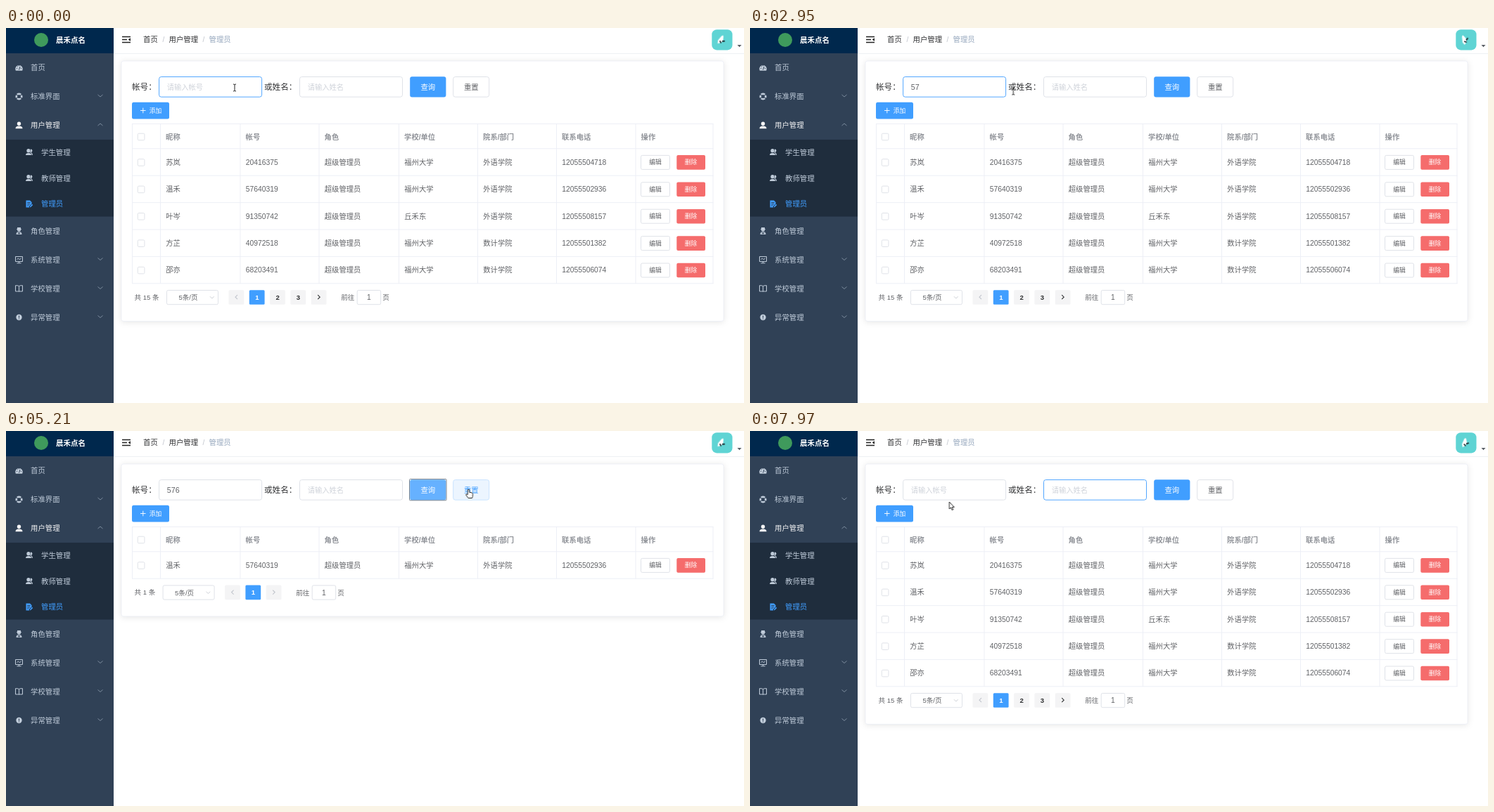
Animation of 1049 by 534 pixels, one loop 8 s. Source, as an HTML page:

```html
<!DOCTYPE html>
<html lang="zh-CN">
<head>
<meta charset="utf-8">
<title>管理员</title>
<style>
html, body { margin: 0; width: 100%; height: 100%; overflow: hidden; background: #fff; }
svg { display: block; width: 1049px; height: 534px; }
text { font-family: "Liberation Sans", "Noto Sans CJK SC", "Noto Sans CJK", sans-serif; white-space: pre; }
.card { fill: #fff; stroke: #ebeef5; filter: drop-shadow(0 1.5px 4.5px rgba(0, 0, 0, .1)); }
.dancer { transform-origin: 1016px 18px; animation: sway .64s step-end infinite; }
@keyframes sway {
  0%, 100% { transform: rotate(38deg); }
  25% { transform: rotate(22deg); }
  50% { transform: rotate(-8deg); }
  75% { transform: rotate(14deg); }
}
</style>
</head>
<body>
<script>
const LOOP = 8000;
const BLUE = '#409eff', BORDER = '#dcdfe6', LINE = '#ebeef5', BODY = '#606266', FAINT = '#c0c4cc';
let keyframes = '', trackCount = 0;

function add(parent, tag, attrs = {}, content = '') {
  const el = document.createElementNS('http://www.w3.org/2000/svg', tag);
  for (const key in attrs) el.setAttribute(key, attrs[key]);
  el.textContent = content;
  if (parent) parent.append(el);
  return el;
}
const group = (parent, x = 0, y = 0) => add(parent, 'g', { transform: `translate(${x} ${y})` });
const box = (parent, x, y, width, height, fill, stroke = 'none', rx = 0) =>
  add(parent, 'rect', { x, y, width, height, fill, stroke, rx, 'stroke-width': .9 });
const line = (parent, d, stroke, width = .9) =>
  add(parent, 'path', { d, stroke, fill: 'none', 'stroke-width': width });
// cy is the optical middle of the glyphs
const label = (parent, x, cy, text, fill = BODY, size = 10.3, extra = {}) =>
  add(parent, 'text', { x, y: cy + size * .36, fill, 'font-size': size, ...extra }, text);
const centered = (parent, x, cy, text, fill, size, extra = {}) =>
  label(parent, x, cy, text, fill, size, { 'text-anchor': 'middle', ...extra });

// Keyframes from [ms, value] pairs
function track(el, prop, points, easing = 'step-end') {
  const name = 'track' + trackCount++;
  const stops = [...points, [LOOP, points.at(-1)[1]]];
  keyframes += `@keyframes ${name}{${stops.map(([ms, v]) => `${ms * 100 / LOOP}%{${prop}:${v}}`).join('')}}`;
  const previous = el.style.animation;
  el.style.animation = (previous ? previous + ',' : '') + `${name} ${LOOP}ms ${easing} infinite`;
}
function showDuring(el, ...spans) {
  const points = spans.flatMap(([from, to]) => [[from, 1], [to, 0]]).filter(([ms]) => ms < LOOP);
  if (points[0][0] > 0) points.unshift([0, 0]);
  track(el, 'opacity', points);
}

const stage = add(document.body, 'svg', { viewBox: '0 0 1049 534' });

// ---------- sidebar ----------
const icons = {
  gauge: ['M-4.6 4.2A5.2 5.2 0 1 1 4.6 4.2Z', 'M0 3L1.5-1.5M-3.4 1H-2.4M-2.4-2L-1.6-1.4M0-3.6V-2.6M3.4 1H2.4'],
  ring: ['', 'M-2.6-2.6A3.7 3.7 0 0 1 2.6-2.6M3.3-1.7A3.7 3.7 0 0 1 3.3 1.7M2.6 2.6A3.7 3.7 0 0 1-2.6 2.6M-3.3 1.7A3.7 3.7 0 0 1-3.3-1.7'],
  user: ['M0-5A2.6 2.6 0 0 1 0 .4A2.6 2.6 0 0 1 0-5M-5 4.7Q-5 1 0 1Q5 1 5 4.7Z', ''],
  people: ['M-1-5A2.4 2.4 0 0 1-1 .3A2.4 2.4 0 0 1-1-5M-5 4Q-5 1-1 1Q3 1 3 4ZM2-4.5A2 2 0 0 1 2.4 0Q5 1 5 4H3.7Q3.6 1.4 1.4 .2Q2.6-2 2-4.5', ''],
  page: ['M-4.5-5H1L3.5-2.5V0L0 3.2V5H-4.5ZM4 .3L5.2 1.5L2.2 4.6L.8 5L1.1 3.4Z', 'M-2.8-2H1.6M-2.8 .2H1.2M-2.8 2.4H-.6'],
  agent: ['M-2.5-5H2.5V-3H3.4V-2H2.6A2.6 2.6 0 0 1-2.6-2H-3.4V-3H-2.5ZM-4 5Q-4 1 0 1Q4 1 4 5Z', 'M0 2V4.5M-2 3H2'],
  screen: ['', 'M-5-4.5H5V2.5H-5ZM0 2.5V4.5M-3 4.8H3M-3-.5L-1-2L1 0L3-2.5'],
  book: ['', 'M0-3.5V4.5M0-3.5Q-1-4.5-5-4.3V4H-1L0 4.5L1 4H5V-4.3Q1-4.5 0-3.5'],
  alert: ['M0-4.2A4.2 4.2 0 0 1 0 4.2A4.2 4.2 0 0 1 0-4.2', 'M0-2.5V.8M0 1.7V2.7'],
};
function icon(x, y, name, color) {
  const [solid, strokes] = icons[name];
  const g = group(stage, x, y);
  add(g, 'path', { d: solid, fill: color });
  line(g, strokes, solid ? '#304156' : color, name === 'ring' ? 2.6 : 1);
}

box(stage, 0, 0, 153, 534, '#304156');
box(stage, 0, 0, 153, 36, '#00284d');
box(stage, 0, 159, 153, 109.5, '#1f2d3d');
add(stage, 'circle', { cx: 50, cy: 17, r: 10, fill: '#3f9a5c' });
label(stage, 71, 17, '晨禾点名', '#fff', 10.5, { 'font-weight': 700 });

const MUTED = '#bfcbd9';
[
  ['首页', 56.5, 'gauge'],
  ['标准界面', 97.5, 'ring', 1],
  ['用户管理', 138.5, 'user', -1, '#f4f4f5'],
  ['角色管理', 289, 'agent'],
  ['系统管理', 330, 'screen', 1],
  ['学校管理', 371, 'book', 1],
  ['异常管理', 412, 'alert', 1],
].forEach(([text, y, glyph, arrow, color = MUTED]) => {
  icon(18.5, y, glyph, color);
  label(stage, 35, y, text, color, 10.4);
  if (arrow) line(stage, `M130.5 ${y - 1 - 1.5 * arrow}l3.5 ${3 * arrow}l3.5 ${-3 * arrow}`, '#909fb0', .8);
});
[['学生管理', 177, 'people', MUTED], ['教师管理', 214, 'people', MUTED], ['管理员', 250.5, 'page', BLUE]]
  .forEach(([text, y, glyph, color]) => {
    icon(33, y, glyph, color);
    label(stage, 50, y, text, color, 10.4);
  });

// ---------- top bar ----------
line(stage, 'M153 36.5H1049', '#eef0f3', 1);
line(stage, 'M165 12.5H177M165 16.5H172M165 20.5H177', '#222', 1.3);
add(stage, 'path', { d: 'M177 14.2V18.8L173.6 16.5Z', fill: '#222' });
label(stage, 195, 16.5, '首页', '#303133', 10.4);
label(stage, 222.5, 16.5, '/', FAINT);
label(stage, 231.5, 16.5, '用户管理', '#303133', 10.4);
label(stage, 279.5, 16.5, '/', FAINT);
label(stage, 288.5, 16.5, '管理员', '#97a8be', 10.4);
box(stage, 1003.3, 2.2, 29.2, 29.2, '#5fd4d4', 'none', 7);
add(stage, 'path', { d: 'M1039.5 24H1045.5L1042.5 27.2Z', fill: '#5a5e66' });
const dancer = add(stage, 'g', { class: 'dancer' });
add(dancer, 'path', { d: 'M1012.8 12Q1014 8.5 1016 12Q1019 15 1018 20L1015 24L1012.5 20Z', fill: '#fff' });
line(dancer, 'M1015 19L1018.5 20.5M1018 17.5L1021 15', '#1d2b30', 1.8);

// ---------- card, table, pager ----------
const columns = [179.5, 219.5, 333, 445, 558.5, 670.5, 782.5, 895, 1005];
const headings = ['昵称', '帐号', '角色', '学校/单位', '院系/部门', '联系电话', '操作'];
const people = [
  ['苏岚', '20416375', '福州大学', '外语学院', '12055504718'],
  ['温禾', '57640319', '福州大学', '外语学院', '12055502936'],
  ['叶岑', '91350742', '丘禾东', '外语学院', '12055508157'],
  ['方芷', '40972518', '福州大学', '数计学院', '12055501382'],
  ['邵亦', '68203491', '福州大学', '数计学院', '12055506074'],
];
const HEAD = 171.8, ROW = 38.4;

function table(parent, rows) {
  const bottom = HEAD + rows.length * ROW;
  let grid = `M179 136.5H1005.5M179 ${HEAD}H1005.5`;
  rows.forEach((_, i) => grid += `M179 ${HEAD + (i + 1) * ROW}H1005.5`);
  columns.forEach(x => grid += `M${x} 136.5V${bottom}`);
  line(parent, grid, LINE);
  const checkbox = y => box(parent, 187.3, y - 4.8, 9.6, 9.6, '#fff', BORDER, 1.5);
  checkbox(155);
  headings.forEach((text, i) => label(parent, columns[i + 1] + 7.6, 155, text, '#909399', 10.3, { 'font-weight': 700 }));
  rows.forEach(([name, account, school, faculty, phone], i) => {
    const y = HEAD + (i + .5) * ROW;
    checkbox(y + .5);
    [name, account, '超级管理员', school, faculty, phone].forEach((text, c) =>
      label(parent, columns[c + 1] + 7.8, y, text));
    box(parent, 902.5, y - 9.6, 41, 20, '#fff', BORDER, 2);
    centered(parent, 923, y + .3, '编辑', BODY, 8.8);
    box(parent, 953.3, y - 9.9, 40.7, 20.6, '#f56c6c', 'none', 2);
    centered(parent, 973.6, y + .3, '删除', '#fff', 8.8, { 'font-weight': 500 });
  });
  return bottom;
}

function pager(parent, total, pages, shift, y) {
  const g = group(parent, shift, y);
  label(parent, 182.5, y, `共 ${total} 条`, BODY, 9.6);
  box(g, 228.5, -10, 73, 20.2, '#fff', BORDER, 2);
  centered(g, 259, .3, '5条/页', BODY, 9.6);
  line(g, 'M290-1.2l2.8 2.8l2.8-2.8', FAINT, .8);
  let x = 316.5;
  const cell = fill => box(g, x, -10.3, 21.8, 20.6, fill, 'none', 1.5);
  const chevron = (dir, color) => line(g, `M${x + 11 - 1.5 * dir}-3.3l${3 * dir} 3l${-3 * dir} 3`, color, 1.1);
  cell('#f4f4f5');
  chevron(-1, FAINT);
  for (let p = 1; p <= pages; p++) {
    x += 29.3;
    cell(p === 1 ? BLUE : '#f4f4f5');
    centered(g, x + 11, 0, p, p === 1 ? '#fff' : '#303133', 9.6, { 'font-weight': 700 });
  }
  x += 29.3;
  cell('#f4f4f5');
  chevron(1, pages > 1 ? '#303133' : FAINT);
  label(g, x + 42.5, .5, '前往', BODY, 9.6);
  box(g, x + 65.5, -10, 33.5, 20.2, '#fff', BORDER, 2);
  centered(g, x + 82.2, 0, '1', BODY, 10.3);
  label(g, x + 101.5, .5, '页', BODY, 9.6);
}

function view(rows, total, pages, shift, loadStart, loadEnd) {
  const g = group(stage);
  const height = rows.length * ROW;
  add(g, 'rect', { class: 'card', x: 164, y: 47, width: 856, height: 178.5 + height, rx: 3, 'stroke-width': .8 });
  const bottom = table(g, rows);
  pager(g, total, pages, shift, bottom + 19.7);
  const veil = box(g, 178.5, 135.5, 827, bottom - 136, '#fff');
  track(veil, 'opacity', [[0, 0], [loadStart, .13], [loadStart + 80, .42], [loadEnd, 0]]);
  const spinner = box(g, 603, (135.5 + bottom) / 2 + 5, 1, 1, BLUE);
  showDuring(spinner, [loadStart + 80, loadEnd]);
  return g;
}
const FILTERED = 4290, CLEARED = 6210, RESTORED = 6450;
showDuring(view(people, 15, 3, 0, 4120, FILTERED), [0, FILTERED], [RESTORED, LOOP]);
showDuring(view([people[1]], 1, 1, -5.4, 6280, RESTORED), [FILTERED, RESTORED]);

// ---------- search form ----------
label(stage, 179, 84, '帐号：', '#303133', 11.6);
label(stage, 367, 84, '或姓名：', '#303133', 11.6);
const accountInput = box(stage, 217.6, 69.5, 146, 28.7, '#fff', BORDER, 3);
track(accountInput, 'stroke', [[0, BLUE], [4120, '#80bcf4'], [4200, '#c0d3e8'], [FILTERED, BORDER]]);
const nameInput = box(stage, 417.5, 69.5, 146, 28.7, '#fff', BORDER, 3);
track(nameInput, 'stroke', [[0, BORDER], [7350, BLUE]]);

const HINT = '#cfd3da';
showDuring(label(stage, 228.7, 84, '请输入帐号', HINT), [0, 2480], [CLEARED, LOOP]);
label(stage, 428.7, 84, '请输入姓名', HINT);
[['5', 2480], ['7', 2640], ['6', 3100]].forEach(([digit, ms], i) =>
  showDuring(label(stage, 228.7 + i * 6, 84, digit, BODY, 10.7), [ms, CLEARED]));
showDuring(box(stage, 229, 77, 1, 14, '#444'), [100, 630], [1160, 1690], [2220, 2480]);
showDuring(box(stage, 235, 77, 1, 14, '#444'), [2480, 2640]);

const query = box(stage, 574.2, 69.2, 51.2, 29.2, BLUE, 'none', 3);
track(query, 'fill', [[0, BLUE], [3580, '#66b1ff'], [4060, '#3a8ee6'], [FILTERED, '#66b1ff'], [6060, BLUE]]);
showDuring(box(stage, 573.5, 68.5, 52.5, 30.3, 'none', '#6c7884', 1), [FILTERED, 6060]);
centered(stage, 599.8, 84, '查询', '#fff', 10.4);

const HOVER = 4660, BLUR = 7350;
const reset = box(stage, 635.7, 69.5, 51, 28.7, '#fff', BORDER, 3);
track(reset, 'fill', [[0, '#fff'], [HOVER, '#ecf5ff'], [BLUR, '#fff']]);
track(reset, 'stroke', [[0, BORDER], [HOVER, '#c6e2ff'], [BLUR, BORDER]]);
showDuring(box(stage, 635.4, 68.8, 51.8, 30, 'none', '#4f83bd', 1), [6060, BLUR]);
const resetText = centered(stage, 661.3, 84, '重置', BODY, 10.4);
track(resetText, 'fill', [[0, BODY], [HOVER, BLUE], [BLUR, BODY]]);

box(stage, 179, 105.7, 53, 23.7, BLUE, 'none', 2.5);
line(stage, 'M191 117.5H198.6M194.8 113.7V121.3', '#fff', .9);
label(stage, 203.8, 117.6, '添加', '#fff', 8.8);

// ---------- mouse pointer ----------
const pointer = add(stage, 'g');
track(pointer, 'transform', [
  [0, 325, 85], [2640, 325, 85], [2950, 374, 90], [3180, 440, 106], [3420, 540, 104], [3580, 596.5, 91],
  [4340, 596.5, 91], [4740, 657.5, 83], [6870, 657.5, 83], [7100, 600, 106], [7330, 490, 86],
  [7670, 440, 86], [7970, 283.3, 101],
].map(([ms, x, y]) => [ms, `translate(${x}px,${y}px)`]), 'linear');
const beam = line(pointer, 'M-2-5Q0-5 0-4Q0-5 2-5M0-4V4M-2 5Q0 5 0 4Q0 5 2 5', '#222', 1);
const shape = d => add(pointer, 'path', { d, fill: '#fff', stroke: '#111', 'stroke-width': .9, 'stroke-linejoin': 'round' });
const arrow = shape('M0 0V10L2.3 8L3.9 11.6L5.6 10.9L4 7.4H7Z');
const hand = shape('M-1.2 7V.8Q0-.6 1.2 .8V4.3Q5.9 4.4 5.9 6.4V9Q5.9 10.5 5 12.5H-.5L-3.8 7.8Q-3.6 6-1.2 7.6Z');
showDuring(beam, [0, 3050], [7250, 7900]);
showDuring(arrow, [3050, 3540], [6950, 7250], [7900, LOOP]);
showDuring(hand, [3540, 6950]);

document.head.append(Object.assign(document.createElement('style'), { textContent: keyframes }));
</script>
</body>
</html>
```
